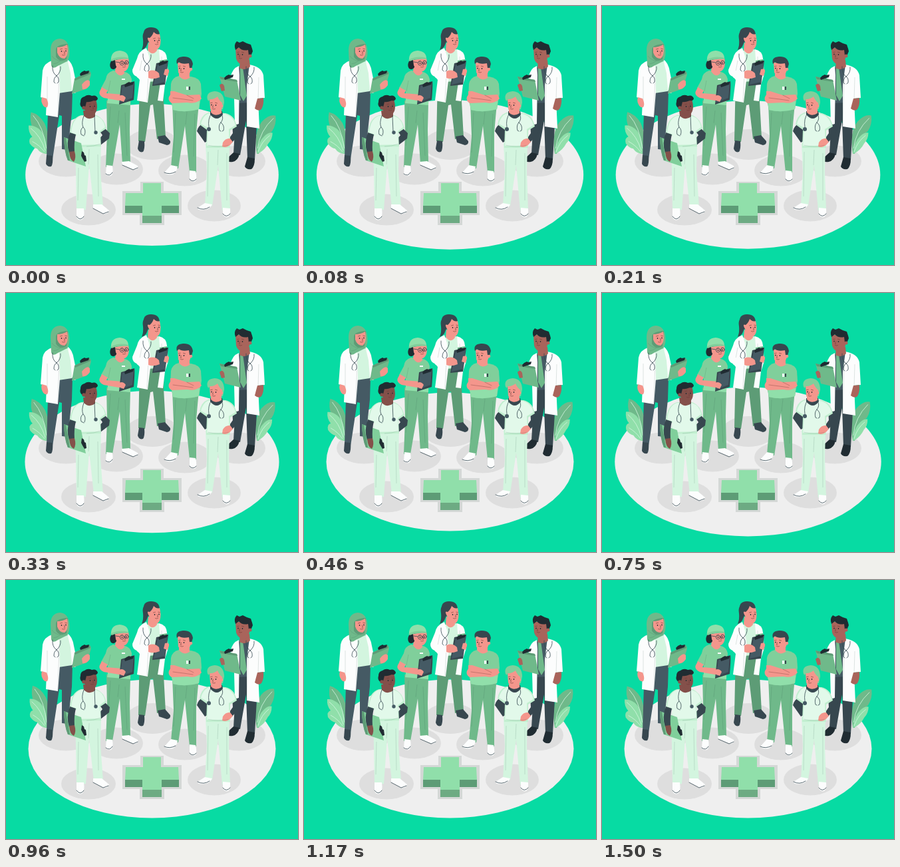
An HTML page that plays this animation: 439x389 px, repeating every 1540 ms.

```html
<!DOCTYPE html>
<html lang="en">
<head>
<meta charset="utf-8">
<title>Medical team</title>
<style>
html, body { margin: 0; width: 100%; height: 100%; overflow: hidden; background: #07dba3; }
svg { display: block; width: 439px; height: 389px; }
.white { fill: #fcfdfd } .pale { fill: #d3f5df } .bright { fill: #e2f9ea } .mint { fill: #c2efd0 }
.light { fill: #90dfaa } .green { fill: #80cf9b } .mid { fill: #6fb98a } .deep { fill: #5d9c76 }
.slate { fill: #455a64 } .dark { fill: #37474f } .ink { fill: #202c32 }
.skin { fill: #f4968c } .tan { fill: #a9645b } .brown { fill: #84504a }
.line { fill: none; stroke: #344750; stroke-width: .8; stroke-linecap: round; stroke-linejoin: round }
.mark { fill: none; stroke: #6d3936; stroke-width: .6; stroke-linecap: round }
.fold { fill: none; stroke: #33594a; stroke-opacity: .22; stroke-width: .7 }
.vein { fill: none; stroke: #d5f7e1; stroke-width: .8 }
</style>
</head>
<body>
<svg viewBox="0 0 439 389">
<defs>
  <g id="face">
    <ellipse class="ink" cx="-2.5" rx=".8" ry="1"/><ellipse class="ink" cx="4" cy="-.4" rx=".8" ry="1"/>
    <path class="mark" d="M-4.5-3l3-.8M2.8-3.8l2.6.4M1.4 0l1.2 3-1.4.3M-1.5 5.6q2.3 1.3 4.3-.4"/>
  </g>
  <g id="scope">
    <path class="line" d="M-6-15Q-7-5 0 0Q7-6 6-14M0 0Q-4 2-4 9l2 2M0 0Q4 2 3 9l-2 2"/>
  </g>
  <g id="clip"><path class="ink" d="M-6 0l3-3 4-2 2 1 5-1-1 4-12 4z"/></g>
</defs>

<ellipse id="floor" cx="219.5" cy="253.5" rx="186" ry="104" fill="#efefef"/>
<g fill="#dedede">
  <ellipse cx="90" cy="233" rx="41" ry="23.5"/><ellipse cx="166" cy="245" rx="40" ry="23.5"/>
  <ellipse cx="220" cy="208" rx="40" ry="23"/><ellipse cx="269" cy="247" rx="40" ry="23.5"/>
  <ellipse cx="350" cy="233" rx="40" ry="23.5"/><ellipse cx="124" cy="306" rx="41" ry="23.5"/>
  <ellipse cx="313" cy="300" rx="40" ry="23.5"/>
</g>

<g id="leftLeaf">
  <path class="mid" d="M62 222Q67 194 59 176Q51 162 39 159Q36 172 41 183Q52 193 59 222z"/>
  <path class="light" d="M62 222Q61 193 50 184Q42 178 35 179Q34 189 40 196Q34 198 36 206Q41 213 47 214Q52 222 62 222z"/>
  <path class="vein" d="M42 164Q57 181 61 214M38 183Q53 195 59 217M40 203Q51 209 58 219"/>
</g>
<g id="rightLeaf">
  <path class="mid" d="M377 222Q371 188 384 173Q394 162 404 164Q406 177 399 188Q386 198 380 222z"/>
  <path class="light" d="M377 222Q379 203 388 195Q394 189 400 190Q400 200 394 206Q389 216 380 221z"/>
  <path class="vein" d="M401 168Q381 187 378 214M396 194Q384 203 379 219"/>
</g>

<g id="cross">
  <path fill="#d4d8d6" d="M202 264H237V278H264V314H238V329H201V314H175V278H202z"/>
  <path class="light" d="M206 266H233V281H259L260 300H234V315H205V300H179L180 281H206z"/>
  <path class="deep" d="M179 300H205V311H179zM234 300H260V311H234z"/>
  <path fill="#6dab83" d="M205 315H234V326H205z"/>
</g>

<g id="hijabDoctor">
  <path class="slate" d="M76 128L100 126 99 160 93 216 84 215 84 165 80 164 70 230 61 228 63 158z"/>
  <path class="dark" d="M61 224L70 225Q71 237 68 241Q62 242 60 237z"/>
  <path class="pale" d="M77 84L94 83 100 101 99 128 79 131z"/>
  <path class="white" d="M69 82Q57 86 55 97L52 137 61 140 60 164 78 167 81 129 80 86z"/>
  <path class="white" d="M92 80Q100 85 102 99L106 118 105 130Q101 133 99 126L97 101z"/>
  <path class="fold" d="M62 106L62 142M80 97L78 166"/>
  <path class="skin" d="M54 137L61 139Q65 147 62 152Q57 153 55 148Q52 143 54 137z"/>
  <path class="mid" d="M103 109L126 98Q129 101 127 106L122 124 99 132z"/>
  <path class="deep" d="M103 109L126 98 127 102 104 112z"/>
  <use href="#clip" x="117" y="102"/>
  <path class="skin" d="M114 118Q122 108 126 113L126 119Q121 126 115 125z"/>
  <path class="mid" d="M67 67Q67 50 81 49Q93 50 95 64Q97 75 92 83L78 90Q70 96 68 89z"/>
  <path class="deep" d="M75 66Q75 58 93 57L91 80Q80 85 75 76z"/>
  <path class="skin" d="M77 62Q85 62 92 58Q95 74 88 79Q80 79 77 70z"/>
  <path class="fold" d="M69 75Q74 84 91 82M71 87Q76 87 82 82"/>
  <use href="#face" x="86" y="68"/>
  <use href="#scope" x="76" y="105"/>
</g>

<g id="ponytailDoctor">
  <path class="deep" d="M201 105L238 106 237 143 240 198 227 200 221 148 217 149 209 204 199 203z"/>
  <path class="dark" d="M200 202L208 203Q209 215 206 219Q200 221 198 214zM228 196L239 194 247 203Q248 208 242 209L230 205z"/>
  <path class="pale" d="M211 67L230 65 238 75 238 112 213 114z"/>
  <path class="white" d="M211 63Q199 68 197 79L190 96Q190 104 197 106L201 111 197 142 213 145 218 104 215 75z"/>
  <path class="white" d="M230 65Q241 67 242 79L244 102 239 118 236 143 228 142 233 108z"/>
  <path class="fold" d="M204 82L200 104M215 82L212 144M234 76L235 111"/>
  <path class="dark" d="M212 38Q204 38 206 50Q207 59 204 66Q213 63 214 50z"/>
  <path class="skin" d="M214 55L225 58 227 67Q220 76 213 66z"/>
  <path class="dark" d="M207 46Q205 32 218 32Q230 32 231 43L217 53 213 55Q208 52 207 46z"/>
  <path class="skin" d="M214 52Q211 46 216 48Q220 45 222 39Q227 44 231 42Q235 59 228 65Q219 67 216 56z"/>
  <use href="#face" x="226" y="52"/>
  <path class="mid" d="M231 82L242 80 243 98 230 101z"/>
  <path class="dark" d="M226 86L244 82 239 118 220 120z"/>
  <path class="slate" d="M228 88L243 84 239 114 222 118z"/>
  <use href="#clip" x="235" y="87"/>
  <path class="white" d="M190 98Q199 96 215 98L214 109 198 108z"/>
  <path class="skin" d="M214 98Q223 94 230 101L231 107Q221 111 214 108zM239 95Q246 93 245 99L243 105 237 103z"/>
  <use href="#scope" x="212" y="87"/>
</g>

<g id="capNurse">
  <path class="mid" d="M151 142L187 145 186 185 187 237 175 237 171 178 160 242 150 242 152 190z"/>
  <path class="white" d="M151 239L160 240Q162 252 158 255Q152 256 150 252zM174 234L185 233 198 240Q200 245 193 246L175 239z"/>
  <path class="line" d="M150 252Q156 257 160 250M175 239L191 246 198 243"/>
  <path class="green" d="M161 97Q151 100 150 110L143 123 153 128 153 145 187 148 189 110Q187 101 179 99z"/>
  <path class="light" d="M153 139L187 142 187 149 152 146z"/>
  <path class="fold" d="M157 112L154 128M170 157L168 176M157 151L153 210M179 160L182 225"/>
  <path class="skin" d="M165 90L177 93 178 101Q171 109 164 98zM144 122L153 127 151 131 175 133 183 139 181 144 147 138Q137 133 142 126z"/>
  <path class="ink" d="M159 81Q154 89 158 94Q163 97 166 92L167 79z"/>
  <path class="skin" d="M164 81L184 78Q187 93 179 98Q168 98 165 89z"/>
  <path class="light" d="M158 82Q157 68 171 67Q184 68 184 79Q172 75 158 82z"/>
  <path class="green" d="M157 81Q170 74 184 78L183 80Q170 78 159 83z"/>
  <use href="#face" x="177" y="86"/>
  <g class="line"><circle cx="174.5" cy="86" r="3"/><circle cx="181.5" cy="85" r="2.7"/><path d="M165 84l6 1M177.5 85h1"/></g>
  <path class="dark" d="M173 119L193 113Q194 117 192 141L170 148z"/>
  <path class="slate" d="M175 120L192 115 190 138 171 145z"/>
  <use href="#clip" x="184" y="119"/>
  <path class="skin" d="M170 135Q176 132 180 138L177 144 169 141z"/>
  <path class="white" d="M174 109h5v2h-5z"/>
</g>

<g id="crossedNurse">
  <path class="mid" d="M250 145L290 146 286 190 286 250 276 250 269 180 259 244 248 242 252 196z"/>
  <path class="white" d="M248 239L258 241Q257 249 251 253Q242 255 238 250zM276 247L285 248Q288 261 284 264Q277 265 276 258z"/>
  <path class="line" d="M238 250Q246 254 255 249M276 260Q281 266 286 260"/>
  <path class="green" d="M260 105Q250 107 248 117L247 138 251 156Q270 161 290 155L294 132 293 117Q291 108 278 106z"/>
  <path class="light" d="M249 143L291 143 290 155Q270 161 251 156z"/>
  <path class="skin" d="M260 99L276 99 276 108Q267 114 260 105z"/>
  <path class="skin" d="M247 128L253 128 272 134 291 133 294 139Q286 148 273 145L249 146Q241 141 247 133z"/>
  <path class="mark" stroke-opacity=".6" d="M251 138Q268 140 281 142M272 134L282 139"/>
  <path class="skin" d="M258 85L278 85Q280 99 273 105Q264 108 259 100z"/>
  <path class="dark" d="M257 87Q254 77 266 76Q279 75 281 87L279 94 276 93 275 86Q264 88 260 84z"/>
  <circle class="skin" cx="278" cy="95" r="2.3"/>
  <use href="#face" transform="translate(265 94) scale(-1 1)"/>
  <path class="white" d="M271 121h3v5h-3z"/><path class="dark" d="M275 121h2v5h-2z"/>
  <path class="fold" d="M272 159L270 178M255 160L252 220M284 162L282 226"/>
</g>

<g id="tieDoctor">
  <path class="dark" d="M347 132L380 130 374 231 363 230 361 172 352 224 342 222z"/>
  <path class="ink" d="M342 220L351 222Q349 232 341 234Q333 235 330 231zM363 227L374 229Q374 241 369 245Q361 246 359 241z"/>
  <path class="slate" d="M348 92L366 91 367 145 346 146z"/>
  <path class="mid" d="M352 93l4-1 1 7 5 36-5 8-5-9z"/>
  <path class="white" d="M366 88Q384 91 387 104L389 138 379 139 381 184 362 181 362 119z"/>
  <path class="white" d="M350 90Q340 94 338 106L335 126 343 138 344 179 350 177 351 104z"/>
  <path class="fold" d="M364 102L362 180M380 107L379 142"/>
  <path class="tan" d="M352 82L366 81 367 91Q359 98 351 93zM378 139L387 138Q388 148 384 155Q380 159 374 154Q376 146 378 139z"/>
  <path class="tan" d="M345 63L367 62Q368 83 360 88Q349 89 346 79z"/>
  <path class="ink" d="M345 66Q342 58 347 53L351 55 356 53 362 56 368 58 370 64 371 68 368 75 365 74 364 66Q355 68 350 62z"/>
  <circle class="tan" cx="367" cy="75" r="2.5"/>
  <use href="#face" transform="translate(353 73) scale(-1 1)"/>
  <path class="mid" d="M321 106L347 111 353 142 329 136z"/>
  <path class="deep" d="M321 106L347 111 348 114 323 110z"/>
  <use href="#clip" x="334" y="108"/>
  <path class="tan" d="M321 119Q325 114 328 120L329 127 324 128z"/>
  <use href="#scope" x="367" y="106"/>
</g>

<g id="frontLeftNurse">
  <path class="pale" d="M104 208L143 206 142 247 146 302 132 302 125 238 120 306 106 307 105 247z"/>
  <path class="white" d="M106 304L117 304Q119 318 114 321Q107 323 106 316zM131 298L144 298 155 307Q154 313 146 312L131 304z"/>
  <path class="line" d="M106 316Q112 324 117 316M131 304L146 312 154 309"/>
  <path class="dark" d="M143 178L156 191 155 199 142 209 139 201 145 194 138 184z"/>
  <path class="mint" d="M113 164Q98 168 96 191L106 195 104 212 143 211 142 190 151 184Q148 169 136 164z"/>
  <path class="bright" d="M113 165Q100 169 98 190L106 193 105 209 142 208 141 188 149 182Q147 169 135 165z"/>
  <path class="green" d="M87 197L113 206 120 241 93 232Q88 219 87 197z"/>
  <path class="deep" d="M87 197L90 198 96 232 93 232Q87 218 87 197z"/>
  <path class="ink" d="M114 218l3 2 1 4 2 1 1 8-3 1-3-5-2-4z"/>
  <path class="dark" d="M96 190L105 193Q102 205 103 219L95 221Q90 206 96 190z"/>
  <path class="brown" d="M116 157L134 158 134 166Q125 173 117 165zM95 219L103 218Q106 228 102 234Q96 232 95 219z"/>
  <path class="brown" d="M116 143L135 140Q140 157 132 163Q120 164 117 153z"/>
  <path class="ink" d="M115 153Q110 150 112 144Q112 137 118 136Q123 132 129 135Q136 133 138 139Q137 143 132 142Q124 145 121 144L119 152z"/>
  <circle class="brown" cx="117" cy="153" r="2.7"/>
  <use href="#face" x="129" y="151"/>
  <path class="line" d="M117 165Q113 176 116 182Q111 185 113 193l4 2M116 182Q121 186 118 194M133 165L134 189"/>
  <circle class="slate" cx="135" cy="190" r="2.7"/>
  <path class="fold" d="M121 211Q132 211 142 207M125 215L124 238M109 243L108 292M138 223L139 286"/>
</g>

<g id="frontRightNurse">
  <path class="pale" d="M300 206L336 207 335 249 337 307 325 307 319 240 310 300 299 299 302 249z"/>
  <path class="white" d="M299 296L310 298Q307 305 299 306Q289 308 288 303zM326 303L337 304Q338 315 334 317Q327 318 326 312z"/>
  <path class="line" d="M288 303Q297 308 306 302M326 312Q331 319 337 312"/>
  <path class="dark" d="M299 173Q288 181 287 188L299 205 306 201 302 189 306 181zM340 175L354 181Q355 188 340 205L334 201 341 191z"/>
  <path class="mint" d="M304 160Q293 164 291 178L302 186 301 213 337 213 337 187 347 181Q344 164 330 161z"/>
  <path class="bright" d="M305 161Q296 165 293 177L304 183 302 210 336 210 335 185 345 179Q342 166 329 162z"/>
  <path class="dark" d="M307 158L325 158 326 163Q317 175 307 163z"/>
  <path class="skin" d="M308 154L324 154 324 161Q315 167 308 160zM337 199Q330 198 326 205L325 211Q333 215 341 204z"/>
  <path class="green" d="M303 141Q300 129 314 128Q328 129 328 145L326 155 322 156 318 140z"/>
  <path class="skin" d="M306 140Q314 140 318 135Q321 142 325 144Q326 157 319 161Q309 162 307 154z"/>
  <path class="green" d="M304 143Q301 131 314 129Q326 131 327 146Q322 145 318 136Q313 140 307 140z"/>
  <circle class="skin" cx="324" cy="150" r="2.3"/>
  <use href="#face" transform="translate(313 149) scale(-1 1)"/>
  <path class="line" d="M309 161Q303 170 305 182M324 162Q328 169 323 175Q319 179 321 187l2 1M323 175Q329 179 327 187l-2 1"/>
  <circle class="slate" cx="305" cy="185" r="3"/>
  <path class="fold" d="M303 209Q319 213 335 209M319 216L318 239M304 219L303 286M332 221L332 292"/>
</g>
</svg>

<script>
const $ = id => document.getElementById(id);
const loop = 1540, steps = 37;

// Two beats: fast rise and slow fall, then an even rise and fall.
const beat = t => 1 + .1 * Math.max(0, Math.min(t / 150, (450 - t) / 300), 1 - Math.abs(t - 750) / 150);

function draw() {
  const step = Math.floor((performance.now() % loop + 3) / loop * steps) % steps;
  const size = beat(step * 1000 / 24 + 35);
  const sway = -1.3 * Math.cos(step / steps * 2 * Math.PI);
  $("floor").setAttribute("rx", 186 * size);
  $("floor").setAttribute("ry", 104 * size);
  $("leftLeaf").setAttribute("transform", `rotate(${sway} 62 222)`);
  $("rightLeaf").setAttribute("transform", `rotate(${-sway} 377 222)`);
  requestAnimationFrame(draw);
}
draw();
</script>
</body>
</html>
```
